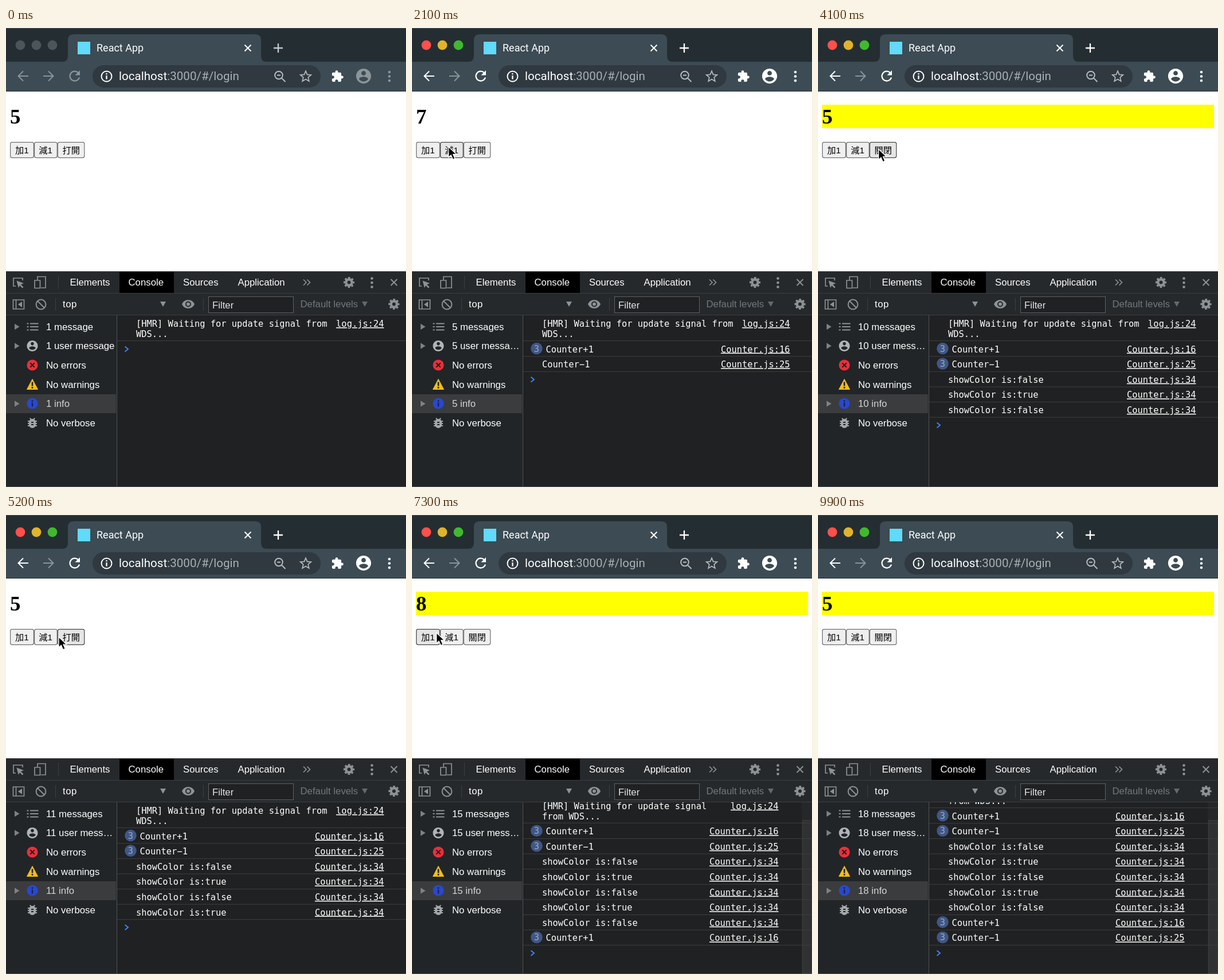
Animation of 698x802 px, one loop 10000 ms. Source, as an HTML page:

```html
<!DOCTYPE html>
<html lang="zh-Hant">
<head>
<meta charset="utf-8">
<title>Counter demo</title>
<style>
  html, body { margin: 0; width: 100%; height: 100%; overflow: hidden; background: #202122; }
  svg { display: block; }
  .chrome { font-family: Roboto, Inter, sans-serif; fill: #fff; }
  .ui { font: 16.8px "Liberation Sans", Arial, sans-serif; fill: #fff; }
  .mono { font: 15.4px "DejaVu Sans Mono", monospace; fill: #fff; }
  .button text { font: 15.2px "Liberation Sans", "Noto Sans CJK TC", "Noto Sans CJK", sans-serif; fill: #000; }
  .button rect { fill: #efefef; stroke: #6f6f6f; stroke-width: 1.2; }
  .button.hover rect { fill: #e5e5e5; stroke: #454545; }
  .line { fill: none; stroke: currentColor; stroke-width: 2; }
  .line.thin { stroke-width: 1.7; }
  .line.thick { stroke-width: 2.3; }
  .solid { fill: currentColor; }
  .grey { color: #8d9295; }
  .lamp { fill: #4c5559; }
  .dim { color: #8b959a; }
  .plus { color: #c3c9cc; }
  .active .dim, .active .plus { color: #fff; }
  .active .red { fill: #ff4f4b; }
  .active .amber { fill: #e0b32c; }
  .active .green { fill: #41b92f; }
  .rule { stroke: #3c3f41; }
  .link { text-decoration: underline; text-anchor: end; }
  .badge { fill: #3f5788; }
  .count { fill: #a3a9b2; text-anchor: middle; }
</style>
</head>
<body>
<svg id="stage" width="698" height="802" viewBox="0 0 698 802">
  <defs>
    <path id="person" class="solid" d="M12 2C6.48 2 2 6.48 2 12s4.48 10 10 10 10-4.48 10-10S17.52 2 12 2zm0 3c1.66 0 3 1.34 3 3s-1.34 3-3 3-3-1.34-3-3 1.34-3 3-3zm0 14.2c-2.5 0-4.71-1.28-6-3.22.03-1.99 4-3.08 6-3.08 1.99 0 5.97 1.09 6 3.08-1.29 1.94-3.5 3.22-6 3.22z"/>
    <g id="gear" fill="none" stroke="currentColor">
      <circle r="5.2" stroke-width="4.4"/>
      <circle r="8.2" stroke-width="2.8" stroke-dasharray="3.6 2.84" stroke-dashoffset="1.8"/>
    </g>
    <path id="cross" class="line" d="M-5.5-5.5 5.5 5.5M5.5-5.5-5.5 5.5"/>
    <path id="fold" fill="#7d8285" d="M-4-5.2 4.5 0-4 5.2z"/>
    <path id="drop" class="solid" d="M-5-4H5L0 5z"/>
    <g id="dots" class="solid"><circle cy="-7.5" r="2.3"/><circle r="2.3"/><circle cy="7.5" r="2.3"/></g>
    <clipPath id="logArea"><rect x="194" y="502" width="504" height="299"/></clipPath>
  </defs>

  <!-- browser frame -->
  <g class="chrome">
    <rect width="698" height="60" fill="#242e32"/>
    <path d="M0 .5H698" stroke="#465054"/>
    <path d="M98 59Q108 59 108 49V21Q108 11 118 11H435Q445 11 445 21V49Q445 59 455 59z" fill="#3c4b54"/>
    <rect y="59" width="698" height="52" fill="#3c4b54"/>
    <path d="M0 110.5H698" stroke="#232c30"/>
    <circle class="lamp red" cx="25" cy="30" r="8.4"/>
    <circle class="lamp amber" cx="53" cy="30" r="8.4"/>
    <circle class="lamp green" cx="81" cy="30" r="8.4"/>
    <rect x="125" y="24" width="22" height="22" fill="#61dafb"/>
    <text x="158" y="41" font-size="18">React App</text>
    <use href="#cross" x="422" y="35" color="#fff"/>
    <path class="line thick plus" d="M467 35H483M475 27V43"/>

    <path class="line dim" d="M39 84H21.5M30 75.5 21.5 84 30 92.5"/>
    <path class="line" color="#8b959a" d="M65 84H82.5M74 75.5 82.5 84 74 92.5"/>
    <g class="dim">
      <path class="line thick" d="M126 78.2A8.4 8.4 0 1 0 128 86.5"/>
      <path class="solid" d="M129 74V82.5H120.5z"/>
    </g>
    <rect x="151" y="65" width="398" height="39" rx="19.5" fill="#2f393f"/>
    <g color="#fff">
      <circle class="line" cx="175.5" cy="84.5" r="9"/>
      <path class="line thick" d="M175.5 83V89.5M175.5 79V81.3"/>
    </g>
    <text x="197" y="91" font-size="20.6">localhost<tspan fill="#a7b0b5">:3000/#/login</tspan></text>
    <g color="#b5bcc0">
      <circle class="line" cx="476" cy="82.5" r="6.8"/>
      <path class="line" d="M481 87.5 487.5 94M473 82.5H479"/>
      <path id="star" class="line thin"/>
    </g>
    <path fill="#fff" transform="translate(567 73) scale(.95)" d="M20.5 11H19V7c0-1.1-.9-2-2-2h-4V3.5C13 2.12 11.88 1 10.5 1S8 2.12 8 3.5V5H4c-1.1 0-1.99.9-1.99 2v3.8H3.5c1.49 0 2.7 1.21 2.7 2.7s-1.21 2.7-2.7 2.7H2V20c0 1.1.9 2 2 2h3.8v-1.5c0-1.49 1.21-2.7 2.7-2.7 1.49 0 2.7 1.21 2.7 2.7V22H17c1.1 0 2-.9 2-2v-4h1.5c1.38 0 2.5-1.12 2.5-2.5S21.88 11 20.5 11z"/>
    <g class="dim">
      <use href="#person" transform="translate(608.3 68.4) scale(1.31)"/>
      <use href="#dots" x="669" y="84.5"/>
    </g>
  </g>

  <!-- page -->
  <rect y="111" width="698" height="315" fill="#fff"/>
  <rect id="band" x="7" y="134" width="684" height="41" fill="#ff0"/>
  <text id="value" x="7" y="167" font-family="'Liberation Serif', Times, serif" font-weight="bold" font-size="36.8"></text>
  <g class="button"><rect x="7.6" y="199.6" width="40.8" height="27" rx="3"/><text x="16" y="219">加1</text></g>
  <g class="button"><rect x="49.6" y="199.6" width="39.6" height="27" rx="3"/><text x="57.2" y="219">減1</text></g>
  <g class="button"><rect x="90.4" y="199.6" width="46.4" height="27" rx="3"/><text id="toggle" x="98.6" y="219"></text></g>

  <!-- developer tools -->
  <rect y="425" width="698" height="377" fill="#202122"/>
  <rect y="425" width="698" height="77" fill="#26292b"/>
  <rect y="502" width="193" height="300" fill="#212527"/>
  <rect x="198" y="426" width="95" height="37" fill="#000"/>
  <path class="rule" d="M0 425.5H698M0 463.5H698M0 501.5H698M91.5 433V456M86.5 472V494M344.5 472V494"/>
  <path d="M193.5 502V802" stroke="#505254"/>

  <g class="grey">
    <path class="line thin" d="M17 451H13V437H29V441"/>
    <path class="solid" d="M18.5 441.5 31 446 26 448.2 30.5 452.8 28.5 454.5 24 450 21.7 454z"/>
    <path class="line thin" d="M55 440V434.5H69V454H61M50 441H59.5V454.5H50z"/>
    <path class="line thin" d="M519 439.5 524 444.5 519 449.5M525.5 439.5 530.5 444.5 525.5 449.5"/>
    <use href="#gear" x="598.5" y="444.5"/>
    <use href="#dots" x="638.5" y="445"/>
    <use href="#cross" x="677" y="444.5"/>
    <path class="line thin" d="M12.5 475H31.5V491H12.5zM17.5 475V491"/>
    <path class="solid" d="M28 478V488L21 483z"/>
    <circle class="line" cx="61" cy="483" r="8.4"/>
    <path class="line" d="M55 477 67 489"/>
    <use href="#drop" x="274" y="482"/>
    <path class="solid" transform="translate(306 470.5)" d="M12 4.5C7 4.5 2.73 7.61 1 12c1.73 4.39 6 7.5 11 7.5s9.27-3.11 11-7.5c-1.73-4.39-6-7.5-11-7.5zM12 17a5 5 0 1 1 0-10 5 5 0 0 1 0 10zm0-8a3 3 0 1 0 0 6 3 3 0 0 0 0-6z"/>
    <use href="#gear" x="677" y="482.5"/>
  </g>
  <rect x="353.5" y="469.5" width="148" height="28" fill="#202122" stroke="#5d6164"/>
  <use href="#drop" x="626" y="482" color="#65696c"/>

  <rect y="640" width="192" height="33" fill="#3b3c3d"/>
  <g class="ui">
    <text x="111.5" y="450">Elements</text>
    <text x="213.5" y="450">Console</text>
    <text x="309" y="450">Sources</text>
    <text x="404.5" y="450">Application</text>
    <text x="99" y="488" letter-spacing=".5">top</text>
    <text x="360" y="489.5" fill="#e2e4e6">Filter</text>
    <text x="513.5" y="488" fill="#74787b">Default levels</text>
    <text id="total" x="70" y="527.5"></text>
    <text id="users" x="70" y="561"></text>
    <text x="70" y="595">No errors</text>
    <text x="70" y="628.5">No warnings</text>
    <text id="info" x="70" y="662" fill="#d3d5d7"></text>
    <text x="70" y="696">No verbose</text>
  </g>
  <use href="#fold" x="19" y="522"/>
  <use href="#fold" x="19" y="555.5"/>
  <use href="#fold" x="19" y="656.5"/>
  <g class="grey">
    <path class="line" d="M42 516.5H56.5M42 522H56.5M42 527.5H56.5M36.5 516.5H39.5M36.5 522H39.5M36.5 527.5H39.5"/>
    <use href="#person" color="#b0b4b6" transform="translate(34.6 544) scale(.95)"/>
    <path class="solid" color="#a3a7a9" transform="translate(34 678)" d="M20 8h-2.81c-.45-.78-1.07-1.45-1.82-1.96L17 4.41 15.59 3l-2.17 2.17C12.96 5.06 12.49 5 12 5s-.96.06-1.41.17L8.41 3 7 4.41l1.62 1.63C7.88 6.55 7.26 7.22 6.81 8H4v2h2.09c-.05.33-.09.66-.09 1v1H4v2h2v1c0 .34.04.67.09 1H4v2h2.81c1.04 1.79 2.97 3 5.19 3s4.15-1.21 5.19-3H20v-2h-2.09c.05-.33.09-.66.09-1v-1h2v-2h-2v-1c0-.34-.04-.67-.09-1H20V8zm-6 8h-4v-2h4v2zm0-4h-4v-2h4v2z"/>
  </g>
  <circle cx="46" cy="589" r="9.6" fill="#e8303a"/>
  <path d="M42.3 585.3 49.7 592.7M49.7 585.3 42.3 592.7" stroke="#26191b" stroke-width="2"/>
  <path d="M46 613.5 55.5 631.5H36.5z" fill="#f5bd18" stroke="#f5bd18" stroke-linejoin="round"/>
  <path d="M46 618.5V625.5M46 627V629.7" stroke="#26221a" stroke-width="2.6"/>
  <circle cx="46" cy="656" r="9.6" fill="#2848d0"/>
  <path d="M46 654.5V661.5M46 650.2V653" stroke="#1c2440" stroke-width="2.4"/>

  <g id="bar">
    <rect x="680" y="502" width="18" height="299" fill="#262728"/>
    <rect x="681.5" y="533.5" width="16" height="267" fill="#303132" stroke="#3c3d3e"/>
  </g>
  <g clip-path="url(#logArea)"><g id="log" class="mono"></g></g>
  <path d="M0 801.5H698" stroke="#4a4b4c"/>

  <path id="cursor" d="M0 0V18.6L4.3 14.6 7.6 22.2 11.2 20.6 8 13.2H13.8z" fill="#000" stroke="#fff" stroke-width="1.3"/>
</svg>

<script>
const LOOP = 10000, STEP = 100, ACTIVE_AT = 400;
const ROW = 26.6, FIRST_ROW = 560.5, LAST_PROMPT = 765;
const $ = id => document.getElementById(id);

// time, action
const clicks = [
  [800, "+"], [1100, "+"], [1400, "+"], [1900, "-"], [2200, "-"], [2500, "-"],
  [3100, "t"], [3600, "t"], [4100, "t"], [4600, "t"], [5500, "t"],
  [6600, "+"], [6900, "+"], [7200, "+"], [7600, "-"], [7900, "-"], [8200, "-"]
];

// time, x, y of the pointer tip
const path = [
  [400, 58, 248], [500, 42, 226], [700, 25, 204], [1300, 24, 202], [1500, 24, 202],
  [1800, 62, 207], [2500, 66, 208], [2800, 103, 210], [2900, 105, 211], [4800, 106, 212],
  [5200, 92, 213], [5700, 91, 213], [6300, 50, 207], [6500, 30, 205], [7200, 29, 205],
  [7500, 70, 207], [8400, 77, 208], [8900, 78, 209], [9300, 110, 262]
];

function pointer(t) {
  const i = path.findIndex(p => p[0] > t);
  if (i < 1) return null;
  const [a, b] = [path[i - 1], path[i]];
  const k = (t - a[0]) / (b[0] - a[0]);
  return [a[1] + (b[1] - a[1]) * k, a[2] + (b[2] - a[2]) * k];
}

function stateAfter(n) {
  const state = { value: 5, on: false, rows: [], total: n + 1 };
  const add = (text, line) => {
    const last = state.rows[state.rows.length - 1];
    if (last && last.text === text) last.count++;
    else state.rows.push({ text, line, count: 1 });
  };
  for (const [, kind] of clicks.slice(0, n)) {
    if (kind === "+") { state.value++; add("Counter+1", 16); }
    else if (kind === "-") { state.value--; add("Counter−1", 25); }
    else { add("showColor is:" + state.on, 34); state.on = !state.on; }
  }
  return state;
}

const text = (x, y, s, cls = "") => `<text x="${x}" y="${y}" class="${cls}">${s}</text>`;
const rule = y => `<path class="rule" d="M194 ${y}H698"/>`;

function drawLog(rows) {
  const prompt = FIRST_ROW + ROW * rows.length;
  const scroll = Math.max(0, prompt - LAST_PROMPT);
  const edge = scroll ? 639.5 : 659.5;
  const lines = scroll
    ? ["[HMR] Waiting for update signal", "from WDS..."]
    : ["[HMR] Waiting for update signal from", "WDS..."];
  let out = text(227, 522, lines[0]) + text(227, 540, lines[1]) +
    text(edge, 522, "log.js:24", "link") + rule(546.5);
  rows.forEach((row, i) => {
    const y = FIRST_ROW + ROW * i;
    const many = row.count > 1;
    if (many) out += `<circle class="badge" cx="217.5" cy="${y - .5}" r="10.3"/>` + text(217.5, y + 5, row.count, "count");
    out += text(many ? 233.5 : 227, y + 6, row.text) +
      text(edge, y + 6, `Counter.js:${row.line}`, "link") + rule(y + 13.3);
  });
  out += `<path d="M207.5 ${prompt - 4}l5.5 4.5-5.5 4.5" fill="none" stroke="#3f82f0" stroke-width="2"/>`;
  $("log").innerHTML = out;
  $("log").setAttribute("transform", `translate(0 ${-scroll})`);
  $("bar").style.display = scroll ? "" : "none";
}

function drawState(n) {
  const { value, on, rows, total } = stateAfter(n);
  $("value").textContent = value;
  $("band").style.display = on ? "" : "none";
  $("toggle").textContent = on ? "關閉" : "打開";
  $("total").textContent = total + (total > 1 ? " messages" : " message");
  $("users").textContent = total + " user " + (total > 9 ? "mess…" : total > 1 ? "messa…" : "message");
  $("info").textContent = total + " info";
  drawLog(rows);
}

const buttons = [...document.querySelectorAll(".button")];
const edges = [7, 49, 90, 137];
let shown = -1;

function draw(t) {
  const n = clicks.filter(c => c[0] <= t).length;
  if (n !== shown) drawState(shown = n);
  $("stage").classList.toggle("active", t >= ACTIVE_AT);

  const at = pointer(t);
  $("cursor").style.display = at ? "" : "none";
  if (at) $("cursor").setAttribute("transform", `translate(${at[0]} ${at[1]})`);
  buttons.forEach((b, i) => b.classList.toggle("hover",
    !!at && at[1] > 199 && at[1] < 227 && at[0] >= edges[i] && at[0] < edges[i + 1]));
}

$("star").setAttribute("d", "M" + Array.from({ length: 10 }, (_, i) => {
  const r = i % 2 ? 4.4 : 9.8, a = i * Math.PI / 5;
  return (523 + r * Math.sin(a)).toFixed(1) + " " + (85 - r * Math.cos(a)).toFixed(1);
}).join("L") + "z");

const start = performance.now();
function loop() {
  const t = (performance.now() - start) % LOOP;
  draw(Math.floor(t / STEP) * STEP);
  requestAnimationFrame(loop);
}
loop();
</script>
</body>
</html>
```
